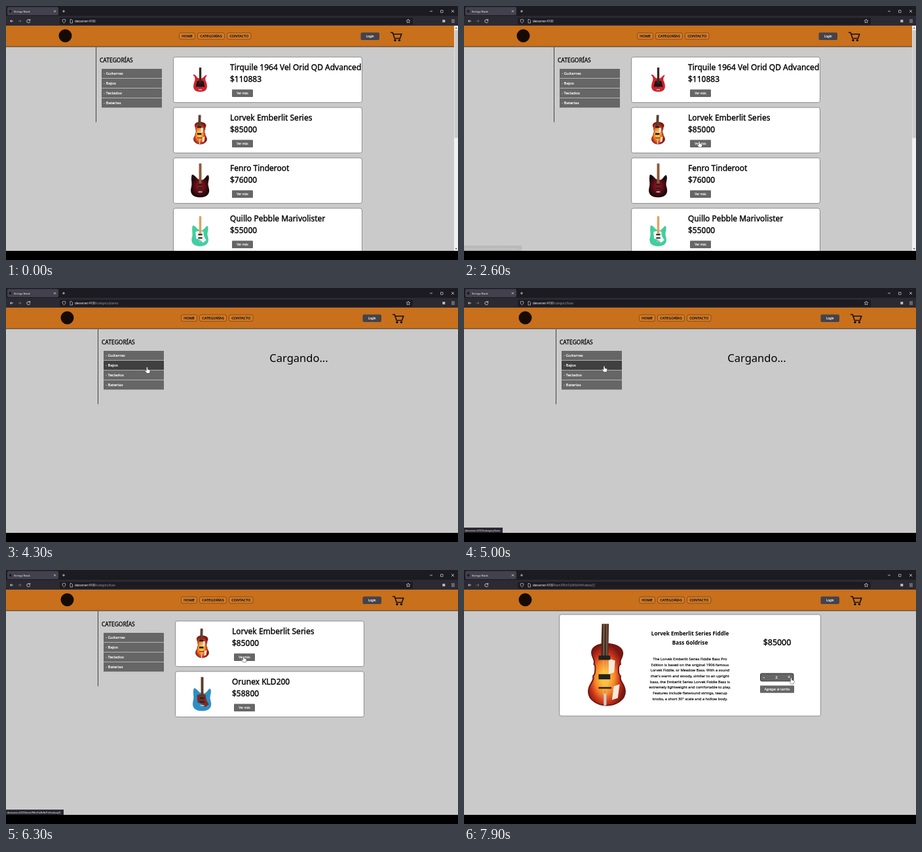
Write an HTML page that moves like this. It is 690x388 px and loops after 8 s.

```html
<!DOCTYPE html>
<html lang="es">
<head>
<meta charset="utf-8">
<style>
html, body { margin: 0; height: 100%; overflow: hidden; background: #000; }
svg { display: block; width: 690px; height: 388px; font-family: "Noto Sans", sans-serif; }
</style>
</head>
<body>
<svg id="stage" viewBox="0 0 690 388"></svg>
<script>
const LOOP = 8000, STEP = 100;
const HOST = 'devserver:4100';
const ITEM = '/item/RKmTaVbNcPeHsdwoq7J';

const rect = (x, y, w, h, fill, rx = 0, extra = '') =>
  `<rect x="${x}" y="${y}" width="${w}" height="${h}" rx="${rx}" fill="${fill}" ${extra}/>`;
const path = (d, fill, stroke = 'none', width = 1) =>
  `<path d="${d}" fill="${fill}" stroke="${stroke}" stroke-width="${width}"/>`;
// Medium weight is regular text with a hairline outline.
const text = (x, y, size, str, { fill = '#000', anchor = 'start', weight = 400, medium = false } = {}) =>
  `<text x="${x}" y="${y}" font-size="${size}" fill="${fill}" text-anchor="${anchor}" font-weight="${weight}"` +
  `${medium ? ` stroke="${fill}" stroke-width="${size * .03}"` : ''}>${str}</text>`;
const group = (x, y, scale, body) => `<g transform="translate(${x} ${y}) scale(${scale})">${body}</g>`;

const white = { fill: '#fff' }, medium = { medium: true };
const centered = { anchor: 'middle' }, strong = { anchor: 'middle', medium: true };
const label = { fill: '#fff', anchor: 'middle', medium: true };

const DEFS = `<defs>
  <radialGradient id="burst" cx=".45" cy=".55" r=".55"><stop offset=".2" stop-color="#ffc13a"/><stop offset=".5" stop-color="#f4822a"/><stop offset=".75" stop-color="#c8321a"/><stop offset="1" stop-color="#7a1712"/></radialGradient>
  <radialGradient id="wine"><stop offset=".2" stop-color="#8d1420"/><stop offset="1" stop-color="#1c080b"/></radialGradient>
  <clipPath id="page"><rect y="30" width="690" height="344"/></clipPath>
</defs>`;

const HORNS = 'M-11-8Q-8-9-5-4Q0 0 5-4Q9-9 10-7Q6-2 9 3Q14 18 0 18Q-14 18-9 3Q-6-3-11-8Z';
const VIOLIN = 'M-2.5-12.5C-5-12-8-11-8.2-8C-8.4-5-6-4-7-1.5C-6-1-6 4-7.5 5C-6.5 8-10 9-10 13.5C-10 18-5 21 0 21C5 21 10 18 10 13.5C10 9 6.5 8 7.5 5C6 4 6-1 7.5-1.5C6.5-4 9-5 8.6-8C8-11 5-12 1.5-12.5Z';
const CUTAWAY = 'M-11-8C-8-9-5-3-2-2L3-1C7-3 9-9 11-7C13-2 9 2 11 8C14 17 9 22 0 22C-10 22-14 17-12 9C-10 3-13-2-11-8Z';

function instrument(shape, color, top, wood, guard = '') {
  return path(shape, color, '#0003', .4) + guard +
    rect(-1.7, top, 3.4, 4 - top, wood) +
    rect(-3, 4, 6, 2, '#222') + rect(-3, 9, 6, 2, '#222') + rect(-2.5, 14, 5, 1.5, '#bbb');
}
const guardPlate = color => path('M-7 1Q0-2 5 1Q4 7 9 13L4 17Q-1 11-6 11Z', color);
const art = {
  horns: instrument(HORNS, '#d3202b', -19, '#3a2a22', path('M-5 2Q0 0 5 2L7 11L0 9L-7 11Z', '#211')),
  violin: path(VIOLIN, 'url(#burst)', '#6e1712', .7) +
    path('M1-4.5L4.5-3.5L4 3L1 4Z', '#f6ead8') +
    path('M-2.7-23.5H1.1L.8-6H-3.2Z', '#4a2f22') + path('M-1.5-23.5L-2 15M0-23.5V15', 'none', '#d8c6a8', .2) +
    rect(-4.5, -6.2, 6.4, 2.4, '#222') + rect(-4.5, 4, 6.4, 2.8, '#222') + rect(-4.5, 11, 7, .9, '#222') +
    path('M3.8 10.5L7 9.5L6 17L2.8 18Z', '#f6ead8') + rect(-1.7, 14.5, 1.5, 6.5, '#ccc'),
  wine: instrument(CUTAWAY, 'url(#wine)', -23, '#8b5a3c'),
  mint: instrument(CUTAWAY, '#3fcfa0', -22, '#d9a566', guardPlate('#f4f6f2')),
  blue: instrument(CUTAWAY, '#2c8fc7', -23, '#5a3a28', guardPlate('#7d2a26')),
};

const VIOLIN_NAME = 'Lorvek Emberlit Series';
const ALL = [
  ['Tirquile 1964 Vel Orid QD Advanced', 110883, 'horns', 1],
  [VIOLIN_NAME, 85000, 'violin', 1],
  ['Fenro Tinderoot', 76000, 'wine', 1.15],
  ['Quillo Pebble Marivolister', 55000, 'mint', 1.04],
];
const BASSES = [ALL[1], ['Orunex KLD200', 58800, 'blue', 1.15]];

const panel = (x, y, w, h) => rect(x, y, w, h, '#fff', 3, 'stroke="#777" stroke-width=".8"');

const card = ([name, price, kind, scale], i) => group(258.5, 78 + 77 * i, 1,
  panel(0, 0, 288, 69.5) +
  group(41, 35, scale, art[kind]) +
  text(86.5, 19.5, 12, name, medium) + text(86.5, 38.3, 12, '$' + price, medium) +
  rect(89.5, 49.5, 32, 11.5, '#666', 1) + text(105.5, 56.8, 4.6, 'Ver más', label));

function browser(route) {
  const line = (d, w = .8) => path(d, 'none', '#eee', w);
  return rect(0, 0, 690, 15, '#1c1b22') + rect(2, 1.5, 78, 12.5, '#42414d', 2) +
    '<circle cx="6.5" cy="8" r="2" fill="#1c1b22"/>' + text(12, 9.6, 4.1, 'Strings Nook', white) +
    line('M73 6.5l3 3m0-3l-3 3M86 8h4m-2-2v4M647 8h4M680 6l4 4m0-4l-4 4', .7) + line('M663.5 6.5h3.5v3.5h-3.5z', .6) +
    rect(0, 15, 690, 15, '#2b2a33') + rect(82, 18, 539, 10.5, '#1c1b22', 2) +
    line('M11 23H6.5l2-2m-2 2l2 2M36.2 21.5a2.5 2.5 0 1 0 .6 2M36.7 20v2h-2') +
    path('M18.5 23h4.5l-2-2m2 2l-2 2', 'none', '#77767f', .8) +
    line('M86 21l2.5-.8l2.5.8q0 4-2.5 5q-2.5-1-2.5-5zM98 20.5h2l1.5 1.5v4H98zM680 21h5m-5 2h5m-5 2h5', .6) +
    line('M614 20l.9 2 2.1.2-1.6 1.4.5 2.2-1.9-1.2-1.9 1.2.5-2.2-1.6-1.4 2.1-.2z', .6) +
    rect(666.3, 21, 4, 4, '#bbb', .5) +
    `<text x="105" y="24.8" font-size="4.4" fill="#fff">${HOST}<tspan fill="#96959d">${route}</tspan></text>`;
}

function header() {
  const tab = (x, w, str) => rect(x, 41, w, 9.8, '#d27c2b', 2.5, 'stroke="#6b3c10" stroke-width=".7"') +
    text(x + w / 2, 48, 5.6, str, strong);
  return '<circle cx="93.5" cy="45.5" r="10" fill="#160b04"/>' +
    tab(267.5, 24, 'HOME') + tab(295.5, 41, 'CATEGORÍAS') + tab(340.5, 36.5, 'CONTACTO') +
    rect(544.5, 40.5, 28.5, 11.5, '#44434b', 2) + text(558.8, 47.8, 4.4, 'Login', label) +
    path('M590 40.5h3.2l3 9h8.3l2.2-6.5h-12.5', 'none', '#111', 1.6) +
    '<circle cx="597" cy="52.3" r="1.6"/><circle cx="603.5" cy="52.3" r="1.6"/>';
}

const sidebar = hover => path('M140.5 63V177.5', 'none', '#333', .9) +
  text(146, 85.5, 8.5, 'CATEGORÍAS', medium) +
  ['Guitarras', 'Bajos', 'Teclados', 'Baterías'].map((name, i) =>
    rect(149, 96 + 15 * i, 92, 14.2, i === hover ? '#404040' : '#666') +
    text(152, 105.2 + 15 * i, 6, '- ' + name, { fill: '#fff', medium: true })).join('');

const loading = x => text(x, 112.5, 16.5, 'Cargando...', centered);

const ABOUT = [
  'The Lorvek Emberlit Series Fiddle Bass Pro',
  'Edition is based on the original 1906 famous',
  'Lorvek Fiddle, or Meadow Bass. With a sound',
  "that's warm and woody, similar to an upright",
  'bass, the Emberlit Series Lorvek Fiddle Bass is',
  'extremely lightweight and comfortable to play.',
  'Features include flatwound strings, teacup',
  'knobs, a short 30" scale and a hollow body.',
];

const detail = count => panel(145.5, 68, 399, 155) +
  group(218, 148, 2.8, art.violin) +
  [VIOLIN_NAME + ' Fiddle', 'Bass Goldrise'].map((s, i) =>
    text(345, 100.3 + 13.5 * i, 8.2, s, { anchor: 'middle', weight: 600 })).join('') +
  ABOUT.map((s, i) => text(345, 138 + 8.65 * i, 5.7, s, strong)).join('') +
  text(478, 115, 12.4, '$85000', strong) +
  rect(452.5, 158, 50.5, 11.8, '#666', 2, 'stroke="#222" stroke-width=".9"') +
  ['-', count, '+'].map((s, i) => text(457.8 + 19.2 * i, 166.4, i === 1 ? 6 : 7.5, s, label)).join('') +
  rect(452, 176.5, 52, 11.3, '#666', 1) + text(478, 183.8, 4.7, 'Agregar al carrito', label);

const scrollbar = () => rect(684, 30, 6, 344, '#f0f0f0') + rect(684.5, 37, 5.5, 164.5, '#cbcbcb') +
  path('M685.5 34.5l1.7-2l1.7 2zM685.5 370l1.7 2l1.7-2z', '#555');

// time, x, y of the pointer's hot spot
const TRACK = [
  [1000, 594, 140], [1800, 320, 197], [2300, 359, 207], [2600, 359, 207], [3000, 227, 137.5],
  [3900, 227, 137.5], [4400, 214, 119.5], [5500, 214, 119.5], [6100, 362.5, 132],
  [6800, 362.5, 132], [7100, 405, 138], [7600, 499.5, 165], [8000, 499.5, 165],
];
function pointerAt(t) {
  const i = TRACK.findIndex(k => k[0] > t);
  if (i < 1) return null;
  const [t0, x0, y0] = TRACK[i - 1], [t1, x1, y1] = TRACK[i];
  const u = (t - t0) / (t1 - t0), e = u * u * (3 - 2 * u);
  return { x: x0 + (x1 - x0) * e, y: y0 + (y1 - y0) * e };
}
const HAND = path('M-1 0q1-1.2 2 0v3l3 .8q1.2.5.7 2l-1 3.2h-4l-3-3.7q0-1.6 1.4-.6l.9.8z', '#fff', '#222', .5);
const ARROW = path('M0 0v8l1.9-1.7l1.3 2.9l1.2-.6l-1.3-2.8h2.5z', '#fff', '#222', .5);
const BEAM = path('M-1.5-2h3M0-2v6M-1.5 4h3', 'none', '#222', .6);

// start, end, opacity, route, width of the link preview
const PREVIEWS = [
  [2600, 2700, .1, ITEM, 88],
  [3000, 3400, 1, '/category/pianos', 63], [3400, 3500, .65, '/category/pianos', 63], [3500, 3600, .2, '/category/pianos', 63],
  [4700, 5200, 1, '/category/bass', 59], [5200, 5300, .3, '/category/bass', 59],
  [6300, 6500, 1, ITEM, 88],
];
function preview(t) {
  const hit = PREVIEWS.find(([a, b]) => t >= a && t < b);
  if (!hit) return '';
  const [, , opacity, route, width] = hit;
  return `<g opacity="${opacity}">${rect(0, 366, width, 8, '#2b2a33')}${text(1.5, 371.6, 3.8, HOST + route, white)}</g>`;
}

function scene(t) {
  const home = t < 3100, item = t >= 6400;
  const route = home ? '' : t < 4800 ? '/category/pianos' : item ? ITEM : '/category/bass';
  const p = pointerAt(t);
  const inside = (x, y, w, h) => p && p.x >= x && p.x <= x + w && p.y >= y && p.y <= y + h;
  const row = inside(149, 96, 92, 59) && !item ? Math.floor((p.y - 96) / 15) : -1;
  const overButton = inside(345, 204, 32, 12) && home || inside(348, 127, 32, 12) && !item || inside(490, 158, 13, 12);
  const cursor = row >= 0 || overButton ? HAND : item && inside(282, 90, 126, 110) ? BEAM : ARROW;

  let body;
  if (item) body = t < 6600 ? loading(345) : detail(t < 7800 ? 1 : 2);
  else body = sidebar(row) +
    (home ? ALL.map(card).join('') : t < 5300 ? loading(447) : BASSES.map(card).join(''));

  return DEFS + rect(0, 0, 690, 388, '#000') +
    '<g clip-path="url(#page)">' + rect(0, 30, 690, 344, '#cacaca') + rect(0, 30, 690, 32, '#c8701c') +
    path('M0 62.2H690', 'none', '#3a2a1c', .9) +
    group(home ? -3 : 0, 0, 1, header() + body) + (home ? scrollbar() : '') + '</g>' +
    browser(route) + preview(t) + (p ? group(p.x, p.y, 1, cursor) : '');
}

const stage = document.getElementById('stage');
let shown = -1;
function tick() {
  const t = Math.floor(performance.now() % LOOP / STEP) * STEP;
  if (t !== shown) stage.innerHTML = scene(shown = t);
  requestAnimationFrame(tick);
}
tick();
</script>
</body>
</html>
```
